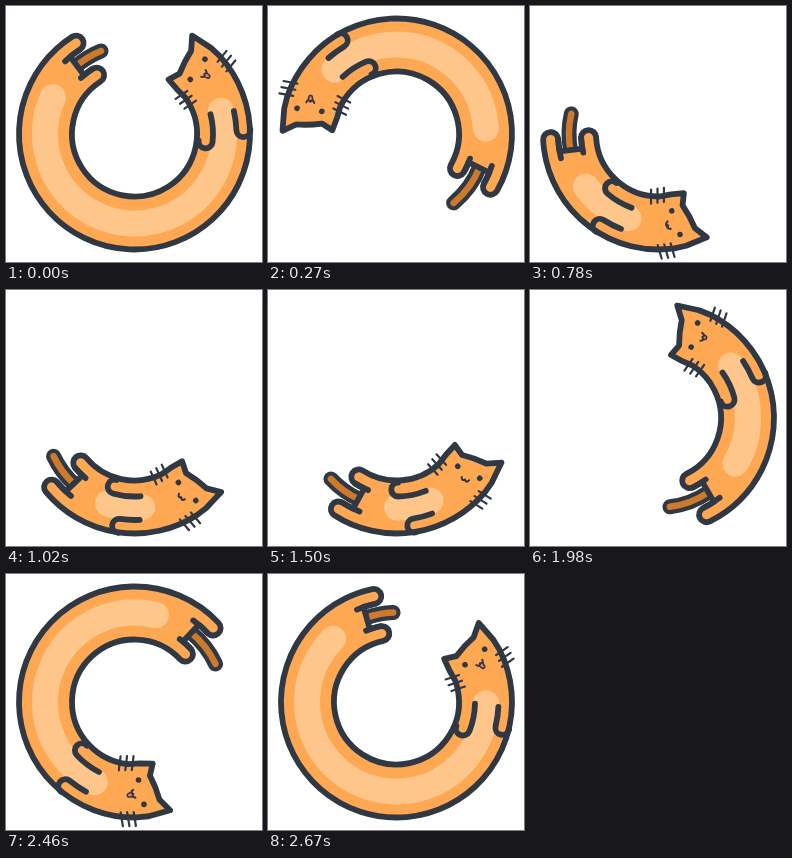
An HTML page with a canvas that plays this animation: 256 by 256 pixels, repeating every 2.7 s.

```html
<!DOCTYPE html>
<html lang="en">
<head>
<meta charset="utf-8">
<title>Cat loader</title>
<style>
  html, body { margin: 0; width: 100%; height: 100%; overflow: hidden; background: #fff; }
  canvas { display: block; }
</style>
</head>
<body>
<canvas id="stage" width="256" height="256"></canvas>
<script>
const ctx = document.getElementById('stage').getContext('2d');
const LOOP = 2700, STEP = 30, LEAD = 1158;
const PEAK = 1138, SETTLED = 2200;
const REST_ANGLE = 40, REST_LENGTH = 82.5, MAX_STRETCH = 205;
const INK = '#303844', FUR = '#ffa853', BELLY = '#ffc68b', TAIL = '#cd7a2c', TONGUE = '#f4796b';
const OUTER = 115.5, INNER = 62.5, PAW = 7.5, LINE = 5.8;

const rad = deg => deg * Math.PI / 180;
const polar = (r, deg) => [r * Math.cos(rad(deg)), r * Math.sin(rad(deg))];

function bezier(x1, y1, x2, y2) {
  const curve = (a, b, s) => 3 * a * s * (1 - s) ** 2 + 3 * b * s * s * (1 - s) + s ** 3;
  return x => {
    let lo = 0, hi = 1;
    for (let i = 0; i < 24; i++) {
      const mid = (lo + hi) / 2;
      if (curve(x1, x2, mid) < x) lo = mid; else hi = mid;
    }
    return curve(y1, y2, lo);
  };
}

const spin = bezier(.47, .305, .34, 1);

// The body lengthens until PEAK, then the rear catches up
function stretch(t) {
  if (t < PEAK) return (t / PEAK) ** 1.6;
  return Math.max(0, (SETTLED - t) / (SETTLED - PEAK)) ** 2;
}

function arc(r, from, to, back = from > to, center = [0, 0]) {
  ctx.arc(...center, r, rad(from), rad(to), back);
}

function stroke(width, color = INK) {
  ctx.lineWidth = width;
  ctx.strokeStyle = color;
  ctx.stroke();
}

function fill(color) {
  ctx.fillStyle = color;
  ctx.fill();
}

function band(r, from, to, width, color) {
  ctx.beginPath();
  arc(r, from, to);
  stroke(width, color);
}

function bodyPath(head, rear) {
  const put = (x, y) => {
    const c = Math.cos(rad(head)), s = Math.sin(rad(head));
    return [x * c - y * s, x * s + y * c];
  };
  ctx.beginPath();
  ctx.moveTo(...polar(INNER, head + 7));
  ctx.lineTo(...put(61.5, -4));
  ctx.lineTo(...put(62, -17));
  ctx.lineTo(...put(74, -14));
  ctx.quadraticCurveTo(...put(86, -20), ...put(98, -23));
  ctx.lineTo(...put(109, -33.5));
  ctx.lineTo(...put(114.5, -12));
  arc(OUTER, head, rear);
  arc(PAW, rear, rear + 180, false, polar(OUTER - PAW, rear));
  arc(OUTER - 2 * PAW, rear, rear - 7);
  arc(INNER + 2 * PAW, rear - 8, rear);
  arc(PAW, rear, rear + 180, false, polar(INNER + PAW, rear));
  arc(INNER, rear, head + 7);
  ctx.closePath();
}

function frontPaw(r, from, to, side) {
  ctx.beginPath();
  arc(r, from, to);
  const turn = side < 0 ? 0 : 180;
  arc(7, to + turn, to + turn + 180 * -side, side > 0, polar(r + side * 7, to));
  stroke(LINE);
}

function face(open) {
  ctx.beginPath();
  for (let i = 0; i < 3; i++) {
    const y = 3 + i * 6.5;
    ctx.moveTo(54, y - 1);
    ctx.lineTo(68, y + 1);
    ctx.moveTo(110, y);
    ctx.lineTo(124, y - 2);
  }
  stroke(2.2);

  for (const [x, y] of [[78, -2.5], [102.5, -7.5]]) {
    ctx.beginPath();
    ctx.arc(x, y, 2.8, 0, 7);
    fill(INK);
  }

  ctx.save();
  ctx.translate(92, 3);
  ctx.rotate(rad(-15));
  if (open > 0) {
    ctx.beginPath();
    ctx.moveTo(-2.2, 1);
    ctx.quadraticCurveTo(-2, 1 + 6 * open, 0, 1 + 5 * open);
    ctx.quadraticCurveTo(2, 1 + 6 * open, 2.2, 1);
    fill(TONGUE);
    stroke(1.6);
  }
  ctx.beginPath();
  ctx.moveTo(-4, -1);
  ctx.quadraticCurveTo(-2.5, 3, 0, 0);
  ctx.quadraticCurveTo(2.5, 3, 4, -1);
  stroke(2.1);
  ctx.restore();
}

function draw(now) {
  const t = (now + LEAD) % LOOP, pull = stretch(t);
  const head = REST_ANGLE - 720 * spin(t / LOOP);
  const rear = head + REST_LENGTH + MAX_STRETCH * pull;
  const tip = rear + 14.5 + 9 * Math.sin(Math.PI * pull) - 5 * pull;

  ctx.clearRect(0, 0, 256, 256);
  ctx.save();
  ctx.translate(128.5, 128);
  ctx.lineCap = ctx.lineJoin = 'round';

  band(89.5, rear - 8, tip, 15, INK);
  band(89.5, rear - 8, tip, 6.5, TAIL);

  bodyPath(head, rear);
  fill(FUR);
  band(89.5, head + 27.5, rear - 33, 26, BELLY);
  bodyPath(head, rear);
  stroke(LINE);
  for (const r of [OUTER - 2 * PAW, INNER + 2 * PAW]) band(r, rear - 11, rear, LINE, INK);

  ctx.rotate(rad(head));
  frontPaw(78.5, 28, 48.5, -1);
  frontPaw(102, 29.5, 40.5, 1);
  face(Math.min(1, pull * 3));
  ctx.restore();
}

function tick() {
  const now = performance.now() % LOOP;
  draw(Math.floor(now / STEP) * STEP);
  requestAnimationFrame(tick);
}
tick();
</script>
</body>
</html>
```
